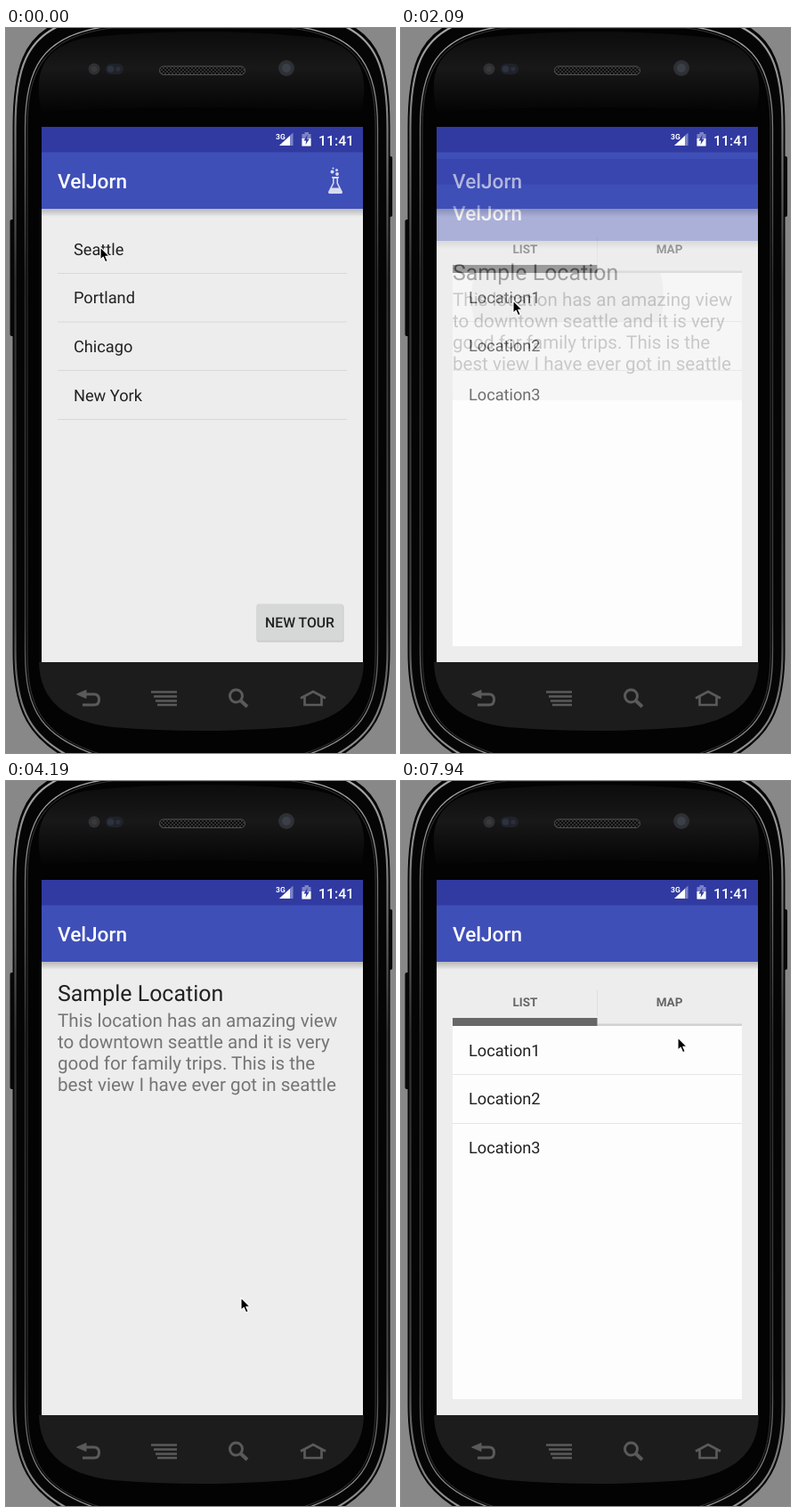
An HTML page for the animation above (8000 ms loop, 437 by 814 pixels).

```html
<!DOCTYPE html>
<html lang="en">
<head>
<meta charset="utf-8">
<title>Tour app demo</title>
<style>
html, body { margin: 0; width: 100%; height: 100%; overflow: hidden; background: #888; }
svg { display: block; width: 437px; height: 814px; font-family: Roboto, "Open Sans", sans-serif; text-rendering: geometricPrecision; }
.title { font-size: 22.6px; font-weight: 500; fill: #fff; }
.row { font-size: 18.2px; fill: #212121; }
.tab { font-size: 13.5px; font-weight: 700; fill: #666; text-anchor: middle; }
.note { font-size: 20.6px; fill: #757575; }
</style>
</head>
<body>
<svg viewBox="0 0 437 814">
  <defs>
    <linearGradient id="shade" x2="0" y2="1">
      <stop offset="0" stop-color="#000" stop-opacity=".22"/>
      <stop offset=".5" stop-color="#000" stop-opacity=".12"/>
      <stop offset="1" stop-color="#000" stop-opacity="0"/>
    </linearGradient>
    <linearGradient id="gloss" x2="0" y2="1">
      <stop offset="0" stop-color="#0c0c0c"/>
      <stop offset=".45" stop-color="#181818"/>
      <stop offset="1" stop-color="#040404"/>
    </linearGradient>
    <linearGradient id="rim" x2="0" y2="1">
      <stop offset="0" stop-color="#aaa"/>
      <stop offset=".15" stop-color="#777"/>
      <stop offset=".35" stop-color="#303030"/>
      <stop offset=".8" stop-color="#444"/>
      <stop offset="1" stop-color="#999"/>
    </linearGradient>
    <pattern id="mesh" width="4" height="4" patternUnits="userSpaceOnUse">
      <rect width="4" height="4" fill="#0c0c0c"/>
      <circle cx="1" cy="1" r=".9" fill="#444"/>
      <circle cx="3" cy="3" r=".9" fill="#444"/>
    </pattern>
    <clipPath id="screenClip"><rect x="40" y="111" width="361" height="601"/></clipPath>
    <clipPath id="enterClip"><rect id="enterArea" x="40" y="111" width="361" height="601"/></clipPath>
    <clipPath id="rowClip"><rect x="58" y="275" width="325" height="54"/></clipPath>
    <g id="appFrame">
      <rect x="40" y="111" width="361" height="601" fill="#ededed"/>
      <rect x="40" y="111" width="361" height="29" fill="#303aa1"/>
      <rect x="40" y="139.500" width="361" height="63.500" fill="#3f4fb8"/>
      <rect x="40" y="203" width="361" height="9" fill="url(#shade)"/>
      <text class="title" x="58" y="179.500">VelJorn</text>
    </g>
  </defs>

  <rect width="437" height="814" fill="#888"/>

  <!-- phone body -->
  <rect x="4.500" y="215" width="8" height="131" rx="2" fill="#080808"/>
  <rect x="426" y="144" width="8" height="68" rx="2" fill="#080808"/>
  <path id="body" fill="#050505" stroke="#050505" stroke-width="2"/>
  <path id="edge" fill="none" stroke="url(#rim)" stroke-width="2.200"/>
  <path id="groove" fill="none" stroke="url(#rim)" stroke-width="1.300"/>
  <path id="lip" fill="#030303" stroke="#353535" stroke-width="1"/>
  <path d="M40 94C30 50 42 20 90 11Q219 -3 349 11C397 20 409 50 399 94Q219 84 40 94Z" fill="url(#gloss)"/>
  <path d="M37 712H402C401 752 377 778 319 785Q219 793 120 785C62 778 38 752 37 712Z" fill="#1c1c1c"/>

  <!-- earpiece, sensors and camera -->
  <rect x="172.500" y="43" width="96" height="9.500" rx="4.500" fill="url(#mesh)" stroke="#505050"/>
  <circle cx="99" cy="46" r="6.500" fill="#303033"/>
  <circle cx="99" cy="46" r="3.200" fill="#39393c"/>
  <rect x="112" y="40" width="20" height="12" rx="6" fill="#20222a"/>
  <circle cx="117.500" cy="46" r="3.800" fill="#2c3240"/>
  <circle cx="126" cy="46" r="2.600" fill="#2b2f3a"/>
  <circle cx="315" cy="45" r="9" fill="#2e3035"/>
  <circle cx="315" cy="45" r="5" fill="#3b3f47"/>

  <!-- hardware keys -->
  <circle id="backGlow" cx="92" cy="752.500" r="17.300" fill="#276f98"/>
  <g fill="none" stroke="#5a5a5a" stroke-width="3">
    <g id="backKey">
      <path d="M88 748H99Q104.500 748 104.500 754T99 760H86"/>
      <path d="M79.500 748L90 743.500V752.500Z" stroke-width="1"/>
    </g>
    <path d="M163 745.500H192M166 750.500H192M168 755.500H192M170 760H192" stroke-width="2.400"/>
    <circle cx="258.500" cy="750" r="7"/>
    <path d="M263.500 755L271 762" stroke-width="4"/>
    <path d="M331 752.500L345 745L359 752.500M335.500 751V760H354.500V751" stroke-width="2.700"/>
  </g>

  <!-- app screens -->
  <g clip-path="url(#screenClip)">
    <rect x="40" y="111" width="361" height="601" fill="#202768"/>
    <g id="home">
      <use href="#appFrame"/>
      <g fill="#d8dbf1">
        <circle cx="366.500" cy="161.500" r="2"/>
        <circle cx="371.500" cy="159.500" r="1.500"/>
        <circle cx="372" cy="164" r="1.900"/>
        <circle cx="367.500" cy="157.500" r="1"/>
        <path d="M366 167H374V168.500H373V174L378 184Q378.300 186 376.500 186H363.500Q361.700 186 362 184L367 174V168.500H366Z"/>
      </g>
      <path d="M368.500 169V174.500L366 179.500H374L371.500 174.500V169Z" fill="#4654b6"/>
      <g id="cities"></g>
      <rect x="281.500" y="647.500" width="98" height="42" rx="2.500" fill="#c9c9c9"/>
      <rect x="281.500" y="646.500" width="97" height="41.500" rx="2.500" fill="#d6d7d7"/>
      <text x="330" y="673" text-anchor="middle" font-size="15.800" font-weight="500" fill="#212121">NEW TOUR</text>
    </g>

    <g clip-path="url(#enterClip)">
      <g id="list">
        <use href="#appFrame"/>
        <rect x="58" y="275" width="325" height="419" fill="#fdfdfd"/>
        <text class="tab" x="139.500" y="253">LIST</text>
        <text class="tab" x="301.500" y="253">MAP</text>
        <path d="M220.500 235V264" stroke="#e0e0e0"/>
        <rect x="220" y="272.500" width="163" height="2.500" fill="#d2d2d2"/>
        <rect x="58" y="266" width="162.500" height="9" fill="#676767"/>
        <circle id="ripple" cx="187" cy="302" r="108" fill="#000" opacity=".05" clip-path="url(#rowClip)"/>
        <g id="places"></g>
      </g>
    </g>
    <g clip-path="url(#enterClip)">
      <g id="detail">
        <use href="#appFrame"/>
        <text x="58" y="247" font-size="24.950" fill="#212121">Sample Location</text>
        <g id="notes"></g>
      </g>
    </g>

    <!-- status icons -->
    <g fill="#fff">
      <text x="303" y="124.500" font-size="8.500" font-weight="700">3G</text>
      <path d="M322.500 117.500V132H307Z" fill="#7d84c4"/>
      <path d="M319 121V132H307Z"/>
      <path d="M335.500 117H340V119H342.500V132.500H332.500V119H335.500Z" fill="#7d84c4"/>
      <path d="M332.500 124H342.500V132.500H332.500Z"/>
      <path d="M338.800 119.500L334.500 126.500H337.200L336.500 131L340.800 124.500H338Z" fill="#303aa1"/>
      <text x="351" y="131.500" font-size="15.800" font-weight="500">11:41</text>
    </g>
  </g>

  <path id="cursor" d="M0 0V14.200L3.200 11.200L5.600 16.700L8.200 15.600L5.800 10.300H10.200Z" fill="#000" stroke="#fff" stroke-width="1.100" stroke-linejoin="round"/>
</svg>

<script>
const LOOP = 8000;
const $ = id => document.getElementById(id);

// Rounded phone outline, drawn inward from the outer edge; top and bottom run off the stage.
function outline(inset) {
  const l = 8 + inset, r = 431 - inset, t = -8 + inset * .5, b = 826 - inset * .3;
  const bend = 10 + inset * .6, top = 54 + inset * 2.6, low = 72 + inset * 2;
  return `M${l} 112C${l} 47 ${l + bend} 9 ${l + top} ${t}H${r - top}C${r - bend} 9 ${r} 47 ${r} 112` +
    `V700C${r} 765 ${r - 16} 800 ${r - low} ${b}H${l + low}C${l + 16} 800 ${l} 765 ${l} 700Z`;
}
for (const [id, inset] of [["body", 0.5], ["edge", 2.5], ["groove", 13.5], ["lip", 16]])
  $(id).setAttribute("d", outline(inset));

const lines = (labels, cls, x, y, step) =>
  labels.map((s, i) => `<text class="${cls}" x="${x}" y="${y + i * step}">${s}</text>`).join("");
const rule = (y, color) => `<path d="M58 ${y}H383" stroke="${color}"/>`;

$("cities").innerHTML = lines(["Seattle", "Portland", "Chicago", "New York"], "row", 76, 254.5, 54.8) +
  [275.5, 330, 384.5, 439.5].map(y => rule(y, "#d8d8d8")).join("");
$("places").innerHTML = lines(["Location1", "Location2", "Location3"], "row", 76, 308.5, 54.8) +
  [329.5, 384.5].map(y => rule(y, "#e6e6e6")).join("");
$("notes").innerHTML = lines([
  "This location has an amazing view", "to downtown seattle and it is very",
  "good for family trips. This is the", "best view I have ever got in seattle"
], "note", 58, 275.5, 24.1);

// Pointer holds each position until the next step: [start, x, y].
const pointer = [
  [0, 106, 246],
  [900, 113, 252], [1050, 132, 264], [1200, 153, 280], [1350, 165, 297],
  [1500, 156, 308], [1650, 138, 308], [1790, 126, 306],
  [2690, 130, 282], [2840, 150, 250], [2990, 175, 268], [3140, 187, 325],
  [3290, 181, 395], [3440, 165, 446], [3590, 150, 474],
  [3740, 137, 520], [3890, 162, 570], [4040, 215, 591], [4190, 264, 580],
  [4340, 260, 522], [4490, 236, 474],
  [5090, 216, 560], [5240, 186, 650], [5390, 160, 706],
  [5690, 126, 736], [5840, 99, 751], [5990, 93, 751],
  [7490, 125, 680], [7640, 200, 520], [7790, 285, 350], [7940, 311, 288]
];

// Screen changes: [start, screen, slide, opacity, screen beneath].
const scenes = [
  [0, "home", 0, 1],
  [300, "list", 30, .45, "home"],
  [450, "list", 0, 1],
  [2090, "detail", 36, .38, "list"],
  [2240, "detail", 1.5, 1],
  [2390, "detail", 0, 1],
  [6590, "list", 0, 1]
];

const at = (steps, t) => steps.findLast(s => s[0] <= t);

function draw(t) {
  const [, top, slide, alpha, under] = at(scenes, t);
  for (const id of ["home", "list", "detail"]) {
    const g = $(id);
    g.setAttribute("display", id === top || id === under ? "inline" : "none");
    g.setAttribute("opacity", id === top ? alpha : 1);
    g.setAttribute("transform", `translate(0 ${id === top ? slide : 0})`);
  }
  const entering = under === "list";
  $("ripple").setAttribute("display", entering ? "inline" : "none");
  // The entering detail page only covers the upper part; the list beneath stays whole.
  $("enterArea").setAttribute("height", entering ? 307 : 601);
  $("list").parentNode.setAttribute("clip-path", entering ? "none" : "url(#enterClip)");

  const hover = t >= 5840 && t < 7490;
  $("backGlow").setAttribute("display", hover ? "inline" : "none");
  $("backKey").setAttribute("stroke", hover ? "#4f86a3" : "#5a5a5a");
  $("backKey").setAttribute("fill", hover ? "#4f86a3" : "#5a5a5a");
  $("backKey").firstElementChild.setAttribute("fill", "none");

  const [, x, y] = at(pointer, t);
  $("cursor").setAttribute("transform", `translate(${x} ${y})`);
}

function tick(now) {
  draw(now % LOOP);
  requestAnimationFrame(tick);
}
draw(0);
requestAnimationFrame(tick);
</script>
</body>
</html>
```
